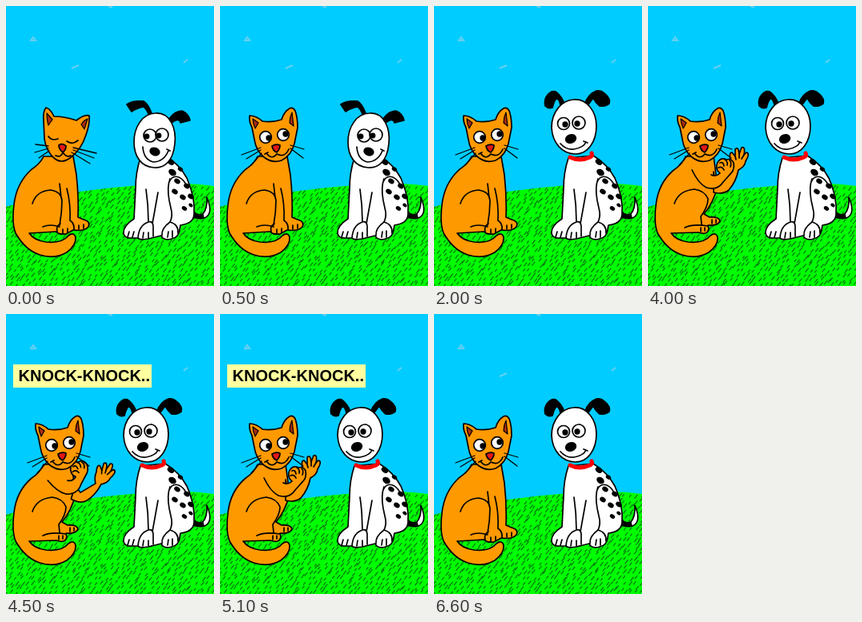
An HTML page that plays this animation: 260x350 px, repeating every 8000 ms.

```html
<!DOCTYPE html>
<html lang="en">
<head>
<meta charset="utf-8">
<title>Cat and dog</title>
<style>
html, body { margin: 0; width: 100%; height: 100%; overflow: hidden; }
svg { display: block; width: 260px; height: 350px; }
.ink { stroke: #000; stroke-width: 1.7; stroke-linecap: round; stroke-linejoin: round; }
.cat { fill: #ff9900; }
.dog { fill: #fff; }
.line { fill: none; }
.black { fill: #000; }
.white { fill: #fff; }
.red { fill: #e01818; }
.ear { fill: #a82a10; stroke-width: 1.2; }
.thin { fill: none; stroke-width: 1.3; }
.collar { fill: none; stroke: #ff0000; stroke-width: 5; }
</style>
</head>
<body>
<svg viewBox="0 0 260 350">
  <defs>
    <clipPath id="field"><path id="hill" d="M0 251Q50 237 100 231Q160 223 215 222Q240 222 260 225V350H0Z"/></clipPath>
  </defs>
  <rect width="260" height="252" fill="#00ccff"/>
  <path d="M128 0l5 2M31 43l3-4 3 4ZM82 78l9-4M222 71l5-4" fill="none" stroke="#66cff0" stroke-width="2"/>
  <use href="#hill" fill="#00ff00"/>
  <path id="grass" clip-path="url(#field)" fill="none" stroke="#087c10" stroke-width="1.3"/>

  <g class="ink dog">
    <path d="M233 257Q240 265 246 260Q252 253 251 239Q260 260 248 265Q240 267 233 263Z"/>
    <path class="black" d="M235 258Q241 263 246 260L247 265Q239 266 235 262Z"/>
    <path d="M168 190Q162 208 162 228L160 266Q146 275 147 284Q148 291 158 290H165Q167 293 178 291L194 287Q197 294 207 291Q216 289 217 280L218 274Q234 272 235 261Q237 240 226 215Q217 198 199 187Z"/>
    <path class="line" d="M175 229Q178 249 178 270Q166 274 165 290M190 233L183 272M205 216Q201 227 204 243L207 257Q208 264 205 270Q194 278 195 287M178 270Q183 268 184 275V288M204 220Q208 211 216 214Q223 217 227 227M205 270Q216 273 215 284M203 282l-1 7M208 281v8M154 282l-2 7M160 282l-2 7M172 283l-1 7M178 283v7"/>
  </g>
  <g id="spots"></g>

  <g id="dogDown" class="ink dog">
    <path class="black" d="M178 135Q176 129 172 126Q163 128 157 132L151 123Q158 118 172 119Q178 123 182 134ZM204 141Q211 131 220 131Q228 134 230 143L218 146Q217 139 207 146Z"/>
    <path d="M187 134C206 133 213 154 211 172C209 194 198 203 185 202C169 201 160 188 160 170C160 151 171 134 187 134Z"/>
    <circle cx="180" cy="162" r="8"/><circle cx="195" cy="161" r="8"/>
    <circle class="black" cx="176" cy="163" r="2.6"/><circle class="black" cx="191" cy="162" r="2.6"/>
    <ellipse class="black" cx="186" cy="182" rx="6" ry="4.5" transform="rotate(20 186 182)"/>
    <path class="line" d="M171 176Q172 192 184 195Q197 195 203 181M201 179l4 2"/>
  </g>
  <g id="dogUp" class="ink dog">
    <path class="collar" d="M170 189Q182 195 195 189Q199 187 197 184"/>
    <path class="black" d="M158 124Q157 117 153 115Q149 121 148 127Q143 129 139 125Q137 117 142 111Q147 105 152 107Q159 112 163 122ZM189 121Q193 110 203 106Q209 105 214 110Q221 116 219 122Q214 126 207 125Q202 121 199 115L193 123Z"/>
    <path d="M174 117C191 115 203 132 203 150C203 170 192 185 177 185C160 185 148 171 147 152C147 132 160 118 174 117Z"/>
    <circle cx="162" cy="147" r="7.5"/><circle cx="181" cy="146" r="8"/>
    <circle class="black" cx="164" cy="148" r="2.8"/><circle class="black" cx="179" cy="147" r="2.8"/>
    <ellipse class="black" cx="171" cy="166" rx="6.5" ry="5" transform="rotate(-20 171 166)"/>
    <path class="line" d="M158 172Q165 180 175 179Q187 177 190 170M187 169l5 2"/>
  </g>

  <g id="catSit" class="ink cat">
    <path d="M47 188Q43 197 31 205Q13 222 10 248Q7 272 12 284Q24 305 42 311Q60 317 76 308Q88 299 87 289Q85 282 78 287Q70 297 50 295Q35 293 29 284L63 282Q65 286 75 285L84 280Q98 282 103 276Q106 269 97 267L90 264Q91 239 88 211L84 188Z"/>
    <path class="line" d="M33 247Q38 231 56 230Q69 232 70 243Q70 258 67 274M67 222L69 240M76 228Q81 247 80 268M46 276Q55 272 67 276M68 272Q62 276 64 282M80 268Q86 272 85 280M71 279v5M77 278v5M91 274v5M97 273v5"/>
  </g>

  <g id="catKnock" class="ink cat">
    <path d="M47 188Q43 198 31 206Q13 222 10 248Q7 272 12 284Q24 305 42 311Q60 317 76 308Q88 299 87 289Q85 282 78 287Q70 297 50 295Q35 293 29 284L63 283Q74 287 76 279L75 274Q87 275 90 269Q89 263 77 264L70 260Q82 246 87 225L82 188Z"/>
    <path class="line" d="M33 247Q38 231 58 229Q71 231 75 241Q75 251 66 263L67 273M46 277Q56 272 75 275M66 277v5M71 277v4M80 267v5M85 267v4"/>
    <g id="palm">
      <path d="M82 207Q83 218 91 222L106 206Q102 199 103 192Q101 183 105 183L109 188L109 179Q113 175 114 185L117 177Q122 175 120 186L123 183Q128 184 122 194Q121 201 113 205Q110 220 101 230Q94 236 82 233Z"/>
      <path class="line" d="M109 188l1 4M114 185v5M120 186l-3 5"/>
    </g>
    <g id="fist">
      <path d="M55 205Q63 222 73 227Q87 231 94 220L102 211Q109 205 107 196Q104 190 98 192Q92 189 88 194Q84 199 87 206L90 209Q85 214 79 211"/>
      <path class="line" d="M90 196q4-2 5 4M96 192q4 2 3 7M102 193q3 3 1 8M88 202q5-2 7 3"/>
    </g>
  </g>

  <g id="headAsleep" class="ink cat">
    <path d="M60 138Q56 129 50 127Q46 132 47 143L48 166Q50 181 60 190Q69 198 80 190Q94 180 100 161Q105 147 104 137Q98 135 88 143Q73 138 60 138Z"/>
    <path class="ear" d="M51 134Q51 143 53 149L58 142ZM102 141Q97 143 94 148L98 154Z"/>
    <path class="line" d="M53 163Q57 169 65 166M76 169Q83 174 90 168M62 187Q69 190 71 183Q76 190 81 187"/>
    <path class="red ink" d="M66 174Q70 171 75 175Q75 180 71 183Q66 179 66 174Z"/>
    <path class="thin" d="M53 175L37 173M53 178L36 183M54 181L41 190M84 177L113 184M84 180L110 190M82 183L105 197"/>
  </g>
  <g id="headAwake" class="ink cat">
    <path d="M53 144Q45 137 37 137Q36 144 40 152L43 167Q45 181 55 189Q65 197 77 193Q89 187 93 172L97 152Q97 139 94 131Q91 126 87 128Q80 132 77 142Q65 146 53 144Z"/>
    <path class="ear" d="M41 141Q41 147 44 153L48 146ZM90 133Q87 139 87 146L92 150Z"/>
    <circle class="white" cx="57" cy="164" r="7.3"/><circle class="white" cx="79" cy="161" r="7.3"/>
    <circle class="black" cx="61" cy="165" r="2.8"/><circle class="black" cx="82" cy="160" r="2.8"/>
    <path class="line" d="M58 184Q65 193 71 185Q81 190 86 179M56 185l4-2"/>
    <path class="red ink" d="M65 175Q70 172 75 174Q75 179 71 183Q66 181 65 175Z"/>
    <path class="thin" d="M51 177L27 186M51 180L33 191M52 184L39 199M88 174L105 179M88 178L104 190"/>
  </g>

  <g id="caption">
    <rect x="9" y="63" width="173" height="29" fill="#ffffa0"/>
    <text x="15.5" y="84" font-family="'Liberation Sans', Arial, sans-serif" font-weight="bold" font-size="20">KNOCK-KNOCK..</text>
  </g>
</svg>
<script>
const el = id => document.getElementById(id);
const show = (id, on) => { el(id).style.display = on ? "" : "none"; };

let seed = 7;
const random = () => (seed = seed * 16807 % 2147483647) / 2147483647;

let blades = "";
for (let y = 228; y < 354; y += 6) {
  for (let x = -4; x < 264; x += 7) {
    const length = 3 + random() * 2.5;
    blades += `M${x + random() * 5} ${y + random() * 4}l${length * 0.8} ${-length}`;
  }
}
el("grass").setAttribute("d", blades);

const spots = [[206, 195, 4], [218, 204, 3], [208, 208, 4.5], [214, 219, 3.5], [211, 232, 3.5],
  [226, 225, 3.5], [221, 239, 3.5], [231, 238, 3.5], [223, 253, 3], [231, 249, 2.5]];
el("spots").innerHTML = spots.map(([x, y, r]) =>
  `<ellipse cx="${x}" cy="${y}" rx="${r * 1.15}" ry="${r * 0.85}" transform="rotate(35 ${x} ${y})"/>`).join("");

const start = performance.now();

function draw() {
  const t = (performance.now() - start) % 8000;
  const within = (from, to) => t >= from && t < to;
  const knocking = within(4000, 6600);
  show("headAsleep", t < 500);
  show("headAwake", t >= 500);
  show("dogDown", t < 2000);
  show("dogUp", t >= 2000);
  show("catSit", !knocking);
  show("catKnock", knocking);
  show("caption", within(4500, 6600));
  // The paws part and meet twice.
  const apart = within(4500, 4700) || within(4900, 5100);
  el("palm").setAttribute("transform", `rotate(${apart ? 16 : 0} 88 230)`);
  el("fist").setAttribute("transform", `rotate(${apart ? -14 : 0} 66 218)`);
  requestAnimationFrame(draw);
}
draw();
</script>
</body>
</html>
```
